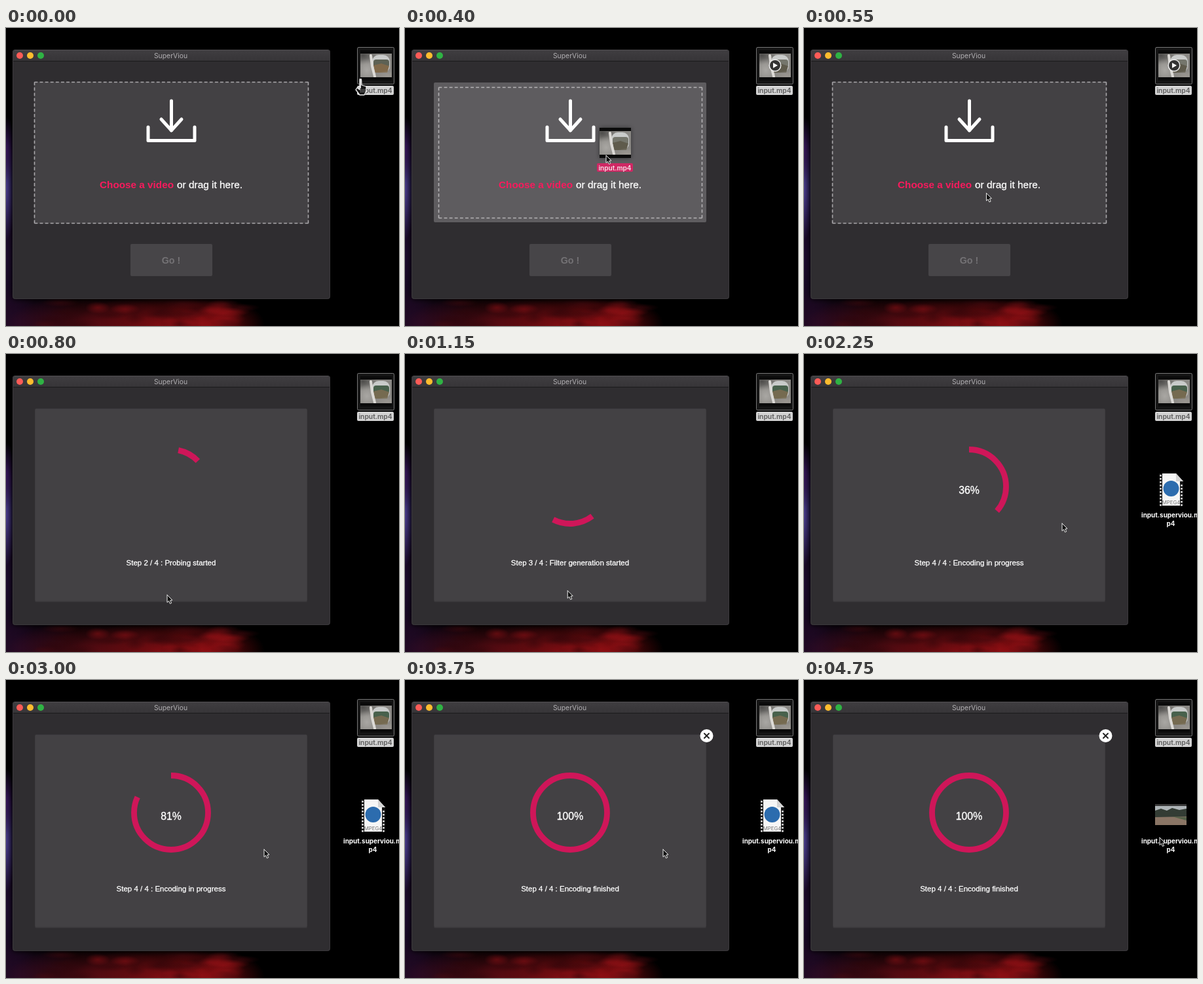
These frames come from a looping animation (600 px wide and 454 px high, 4.8 s). An HTML page with a canvas:

```html
<!DOCTYPE html>
<html lang="en">
<head>
<meta charset="utf-8">
<title>SuperViou</title>
<style>
html, body { margin: 0; width: 100%; height: 100%; overflow: hidden; background: #000; }
canvas { display: block; }
</style>
</head>
<body>
<canvas id="stage" width="600" height="454"></canvas>
<script>
const g = document.getElementById('stage').getContext('2d');
const LOOP = 4800;
const APP = '"Liberation Sans", Arial, sans-serif';
const UI = 'Inter, Roboto, sans-serif';
const RING = '#cf1659', ACCENT = '#f81a5d', PANEL = '#434144';

// Main moments of the loop, in ms
const GRAB = 80, DROP = 500, GO = 700, FILTER = 1150, ENCODE = 1650, DONE = 3300, PREVIEW = 4350;

// Cursor tip: time, x, y
const PATH = [
  [0, 541, 78], [GRAB, 541, 78], [400, 307, 194], [DROP, 290, 212], [650, 247, 360],
  [800, 246, 367], [1100, 248, 362], [1500, 253, 331], [1600, 253, 331], [2150, 394, 258],
  [3950, 394, 258], [4450, 538, 246], [4700, 543, 240], [LOOP, 543, 240]
];

function cursorAt(t) {
  const i = Math.max(1, PATH.findIndex(p => p[0] > t));
  const [t0, x0, y0] = PATH[i - 1], [t1, x1, y1] = PATH[i];
  const k = (t - t0) / (t1 - t0), e = k * k * (3 - 2 * k);
  return [x0 + (x1 - x0) * e, y0 + (y1 - y0) * e];
}

function rect(x, y, w, h, fill, r = 0) {
  g.beginPath();
  g.roundRect(x, y, w, h, r);
  g.fillStyle = fill;
  g.fill();
}

function outline(x, y, w, h, color, r = 0) {
  g.beginPath();
  g.roundRect(x, y, w, h, r);
  g.strokeStyle = color;
  g.lineWidth = 1;
  g.stroke();
}

function disc(x, y, r, fill) {
  g.beginPath();
  g.arc(x, y, r, 0, 7);
  g.fillStyle = fill;
  g.fill();
}

function shape(points, fill) {
  g.beginPath();
  points.forEach(p => g.lineTo(...p));
  g.closePath();
  g.fillStyle = fill;
  g.fill();
}

function line(points, color, width, cap = 'round') {
  g.beginPath();
  points.forEach(p => g.lineTo(...p));
  g.strokeStyle = color;
  g.lineWidth = width;
  g.lineJoin = 'round';
  g.lineCap = cap;
  g.stroke();
}

// Each side starts and ends with a full dash, like a CSS dashed border
function dashedBox(x, y, w, h, color) {
  const dash = 4.85, gap = 3.25;
  const side = (a, b, length) => {
    const count = Math.round((length + gap) / (dash + gap));
    g.setLineDash([dash, (length - count * dash) / (count - 1)]);
    line([a, b], color, 1.6, 'butt');
  };
  side([x, y], [x + w, y], w);
  side([x, y + h], [x + w, y + h], w);
  side([x, y], [x, y + h], h);
  side([x + w, y], [x + w, y + h], h);
  g.setLineDash([]);
}

function text(s, x, y, font, fill, align = 'center', weight = 0) {
  g.font = font;
  g.fillStyle = g.strokeStyle = fill;
  g.textAlign = align;
  g.fillText(s, x, y);
  if (weight) {
    g.lineWidth = weight;
    g.strokeText(s, x, y);
  }
}

function glow(x, y, rx, ry, color) {
  g.save();
  g.translate(x, y);
  g.scale(rx, ry);
  const grad = g.createRadialGradient(0, 0, 0, 0, 0, 1);
  grad.addColorStop(0, color + 'ff');
  grad.addColorStop(.5, color + '88');
  grad.addColorStop(1, color + '00');
  g.fillStyle = grad;
  g.fillRect(-1, -1, 2, 2);
  g.restore();
}

function desktop() {
  rect(0, 0, 600, 454, '#000');
  glow(0, 350, 45, 190, '#1c0a2c');
  glow(-2, 245, 18, 80, '#4d4096');
  glow(0, 185, 16, 50, '#321354');
  glow(20, 450, 100, 60, '#240a26');
  glow(130, 452, 130, 46, '#4a0a12');
  glow(235, 452, 130, 46, '#7c0d12');
  glow(310, 452, 85, 42, '#7a0a0e');
  // Soft streaks of cloud
  let seed = 7;
  const random = () => (seed = seed * 16807 % 2147483647) / 2147483647;
  for (let i = 0; i < 34; i++) {
    const x = 60 + 300 * random(), y = 418 + 36 * random();
    const tone = i % 2 ? '#2c0509' : y > 426 && x > 130 ? '#a21318' : '#4d0a10';
    g.globalAlpha = .45;
    glow(x, y, 14 + 24 * random(), 5 + 8 * random(), tone);
  }
  g.globalAlpha = 1;
}

function windowFrame() {
  g.save();
  g.shadowColor = '#000';
  g.shadowBlur = 8;
  rect(10, 33, 485, 380, '#2f2d30', 4);
  g.restore();
  const bar = g.createLinearGradient(0, 33, 0, 51);
  bar.addColorStop(0, '#403e41');
  bar.addColorStop(1, '#363437');
  rect(10, 33, 485, 17, bar, [4, 4, 0, 0]);
  rect(10, 50, 485, 1, '#1b1a1c');
  outline(10.5, 33.5, 484, 379, '#3b393c', 4);
  rect(13, 33, 479, 1, '#504e51');
  disc(21, 42, 5, '#fc5b57');
  disc(37, 42, 5, '#fdbc2e');
  disc(53, 42, 5, '#2fb344');
  text('SuperViou', 251.5, 46, '10.4px ' + UI, '#b1afb2');
}

function dropView(hover) {
  if (hover) {
    rect(44, 83, 416, 213, '#5e5c5f', 2);
    dashedBox(51.5, 90.5, 402, 199, '#b4b2b5');
  } else {
    rect(43, 82, 419, 216, PANEL);
    dashedBox(43.5, 82.5, 418, 215, '#aaa8ab');
  }
  line([[252.5, 111], [252.5, 156]], '#fff', 5);
  line([[237, 139], [252.5, 156], [268, 139]], '#fff', 5);
  line([[217, 151], [217, 171.5], [288, 171.5], [288, 151]], '#fff', 5);
  text('Choose a video', 143, 244, 'bold 15.3px ' + APP, ACCENT, 'left');
  text('or drag it here.', 261, 244, '15.4px ' + APP, '#fff', 'left', .3);
  rect(190, 329, 125, 49, '#474548', 2);
  text('Go !', 252, 359, 'bold 14.3px ' + APP, '#747275');
}

function arc(from, sweep) {
  const rad = Math.PI / 180;
  g.beginPath();
  g.arc(252, 202, 56.5, (from - 90) * rad, (from + sweep - 90) * rad);
  g.strokeStyle = RING;
  g.lineWidth = 8.8;
  g.lineCap = 'butt';
  g.stroke();
}

function progressView(t) {
  rect(44, 83, 416, 295, '#39373a', 2);
  rect(44.5, 83.5, 415, 293, PANEL, 2);
  let status = 'Step 2 / 4 : Probing started';
  if (t < ENCODE) {
    const u = t - 800;
    arc(11 + .376 * u, 67.5 - 32.5 * Math.cos(u * Math.PI / 750));
    if (t >= FILTER) status = 'Step 3 / 4 : Filter generation started';
  } else {
    const part = Math.min(1, (t - ENCODE) / (DONE - ENCODE));
    arc(0, 360 * part);
    text(Math.floor(part * 100) + '%', 252, 213, '15.8px ' + APP, '#fff', 'center', .35);
    status = 'Step 4 / 4 : Encoding ' + (t < DONE ? 'in progress' : 'finished');
  }
  text(status, 252, 321.5, '11.5px ' + APP, '#fff', 'center', .3);
  if (t >= DONE) {
    disc(460.5, 85, 10, '#fff');
    line([[457, 81.5], [464, 88.5]], '#222', 2);
    line([[464, 81.5], [457, 88.5]], '#222', 2);
  }
}

// Soft stand-in for the clip's picture
function clipThumb(x, y, view) {
  const [ground, trees] = {
    path: ['#80694a', '#5d6154'], shade: ['#5f5b4c', '#75766c'], green: ['#756a50', '#48614c']
  }[view];
  g.save();
  g.translate(x, y);
  rect(0, 0, 48, 46, '#0b0b0b');
  g.beginPath();
  g.rect(0, 5, 48, 36);
  g.clip();
  rect(0, 5, 48, 36, '#8b8985');
  glow(4, 8, 22, 14, '#4f4e4c');
  glow(10, 30, 16, 18, '#a9a7a3');
  rect(18, 7, 27, 27, '#c9cbca', 10);
  rect(20, 14, 24, 12, trees, 4);
  shape([[20, 23], [32, 20], [44, 24], [41, 34], [22, 34]], ground);
  line([[16, 8], [18, 24], [22, 40]], '#dcdad6', 4);
  glow(42, 39, 18, 8, '#9b9791');
  g.restore();
}

function inputFile(t) {
  rect(536, 29, 57, 57, '#151515', 2);
  outline(536.5, 29.5, 56, 56, '#777', 2);
  clipThumb(541, 34, t < 200 ? 'path' : t < 600 ? 'shade' : 'green');
  if (t > 50 && t < 600) {
    disc(565, 57, 9.5, '#eee');
    disc(565, 57, 8, '#333');
    shape([[562, 53], [562, 61], [569, 57]], '#fff');
  }
  rect(536, 88, 56, 14, '#d3d3d3', 2);
  text('input.mp4', 564, 98.5, '600 10.3px ' + UI, '#5b5b5b');
}

function outputFile(t) {
  if (t < PREVIEW) {
    shape([[542, 182], [568, 182], [579, 194], [579, 231], [542, 231]], '#f6f6f6');
    rect(542, 182, 5, 49, '#151515');
    rect(574, 194, 5, 37, '#151515');
    for (let y = 184; y < 230; y += 5) {
      rect(543.3, y, 2.4, 2.6, '#f6f6f6', .6);
      if (y > 194) rect(575.3, y, 2.4, 2.6, '#f6f6f6', .6);
    }
    shape([[568, 182], [579, 194], [568, 194]], '#d4d4d4');
    disc(560.5, 205, 12, '#2c6cae');
    text('MPEG4', 560.5, 228.5, '7.8px ' + UI, '#777');
  } else {
    rect(536, 189, 48, 32, '#77736c');
    rect(536, 189, 48, 3, '#383838');
    rect(536, 192, 48, 9, '#aeb4b7');
    shape([[536, 199], [545, 196], [554, 199], [562, 195], [573, 198], [584, 196], [584, 210], [536, 209]], '#333c34');
    shape([[536, 209], [584, 208], [584, 221], [536, 221]], '#8a7565');
    shape([[562, 208], [584, 209], [584, 214]], '#536047');
  }
  const font = '700 9.9px ' + UI;
  text('input.superviou.m', 515, 249, font, '#fff', 'left');
  text('p4', 560, 262, font, '#fff');
}

function dragged(x, y) {
  g.save();
  g.shadowColor = '#0008';
  g.shadowBlur = 7;
  rect(x - 10, y - 42, 48, 46, '#0b0b0b');
  g.restore();
  clipThumb(x - 10, y - 42, 'shade');
  rect(x - 14, y + 12, 55, 13, '#cf2864', 2);
  text('input.mp4', x + 13.5, y + 22.5, '600 10.1px ' + UI, '#f7dfe7');
}

function arrow(x, y) {
  const points = [[0, 0], [0, 11.5], [2.6, 9.2], [4.4, 13.4], [6.6, 12.5], [4.8, 8.4], [8, 8]];
  g.save();
  g.translate(x, y);
  shape(points, '#111');
  line([...points, points[0]], '#eee', 1);
  g.restore();
}

function hand(x, y) {
  const points = [[-1, 0], [1.5, 0], [2, 9], [9, 11], [9, 18], [6, 24], [-1, 24], [-7, 16], [-5, 13], [-1, 16]];
  g.save();
  g.translate(x, y);
  shape(points, '#151515');
  line([...points, points[0]], '#eee', 1.3);
  line([[0, 1], [0, 13]], '#eee', 1.8);
  for (const dx of [1, 4, 7]) line([[dx, 15], [dx, 20]], '#aaa', .8);
  g.restore();
}

function draw(t) {
  const [x, y] = cursorAt(t);
  const dragging = t > GRAB && t < DROP;
  desktop();
  windowFrame();
  if (t < GO) dropView(dragging && x < 460);
  else progressView(t);
  inputFile(t);
  if (t >= ENCODE - 50) outputFile(t);
  if (dragging) dragged(x, y);
  (t <= GRAB ? hand : arrow)(x, y);
}

const start = performance.now();
function tick() {
  draw((performance.now() - start) % LOOP);
  requestAnimationFrame(tick);
}
tick();
</script>
</body>
</html>
```
